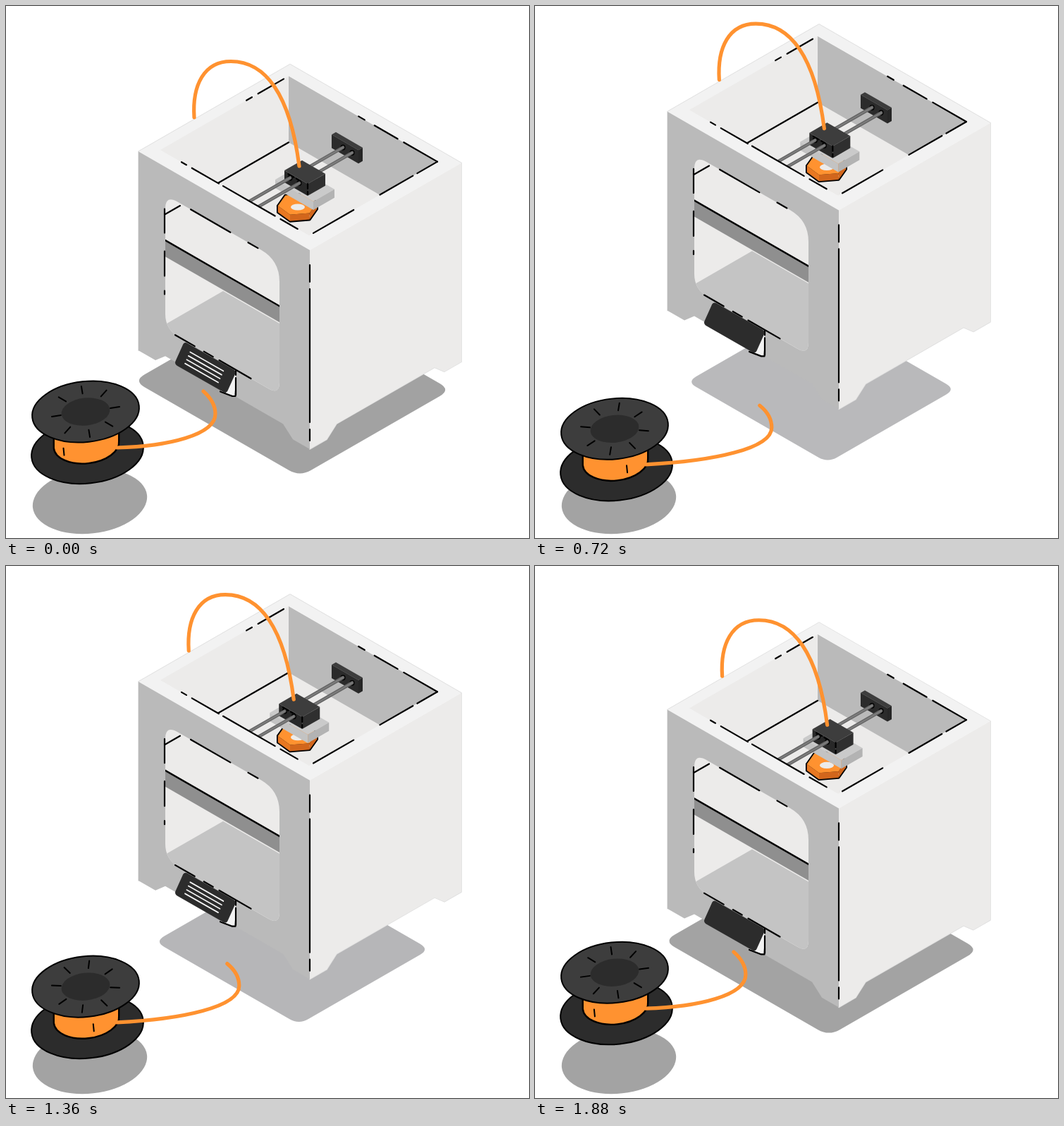
Write an HTML page with a canvas that moves like this. It is 742 by 754 pixels and loops after 1.92 s.

```html
<!DOCTYPE html>
<html lang="en">
<head>
<meta charset="utf-8">
<title>3D printer</title>
<style>
  html, body { margin: 0; width: 100%; height: 100%; overflow: hidden; background: #fff; }
  canvas { display: block; width: 742px; height: 754px; }
</style>
</head>
<body>
<canvas id="stage" width="742" height="754"></canvas>
<script>
const ctx = document.getElementById('stage').getContext('2d');
const LOOP = 1920, STEP = 40;
const ORANGE = '#ff9230', LIGHT = '#ecebea', RIM = '#f2f2f2', GREY = '#bababa';
const DARK = '#2c2c2c', DISC = '#3d3d3d', BLACK = '#000';
const RAD = Math.PI / 180, TILT = -6.3 * RAD, SLOPE = 0.575;

// Printer sizes: width, depth and height of the shell, then the opening on top
const W = 243, D = 215, H = 282;
const IN = { a0: 18.5, a1: 229.5, b0: 17.5, b1: 199.5 };
const WIN = { a0: 43, a1: 205, top: 39.5, low: 230 };

// Box space to stage: a runs left and b right from the front corner, z runs down
const P = (a, b, z = 0) => [431 - a + b, 346 - SLOPE * (a + b) + z];

// ---- easing ----
const smooth = s => s * s * (3 - 2 * s);

// Eased curve with level ends and handles at x1 and x2
function ease(x, x1, x2) {
  let lo = 0, hi = 1;
  for (let i = 0; i < 24; i++) {
    const p = (lo + hi) / 2, q = 1 - p;
    if (3 * q * q * p * x1 + 3 * q * p * p * x2 + p ** 3 < x) lo = p; else hi = p;
  }
  return smooth(lo);
}

// There and back: each way takes `half` ms
function swing(t, half) {
  const s = (t % (2 * half)) / half;
  return s < 1 ? smooth(s) : 1 - smooth(s - 1);
}

const liftAt = t => 70 * (t < 1000 ? smooth(t / 1000) : 1 - ease((t - 1000) / 1000, 0.167, 0.667));

// ---- drawing helpers ----
function trace(pts) {
  ctx.beginPath();
  pts.forEach(p => ctx.lineTo(...p));
}

function fill(color) {
  ctx.fillStyle = color;
  ctx.fill();
}

function stroke(color, width) {
  ctx.strokeStyle = color;
  ctx.lineWidth = width;
  ctx.lineCap = ctx.lineJoin = 'round';
  ctx.stroke();
}

function poly(color, ...pts) {
  trace(pts);
  ctx.closePath();
  fill(color);
}

function line(color, width, ...pts) {
  trace(pts);
  stroke(color, width);
}

// Broken black line; the pattern lists dash, gap, dash ...
function dashed(from, to, ...pattern) {
  ctx.setLineDash([...pattern, 999]);
  line(BLACK, 2.2, from, to);
  ctx.setLineDash([]);
}

function oval(x, y, rx, ry, color, edge = 0, tilt = TILT) {
  ctx.beginPath();
  ctx.ellipse(x, y, rx, ry, tilt, 0, 2 * Math.PI);
  fill(color);
  if (edge) stroke(BLACK, edge);
}

function roundPath(pts, cuts) {
  const n = pts.length;
  const toward = (p, q, cut) => {
    const k = cut / Math.hypot(q[0] - p[0], q[1] - p[1]);
    return [p[0] + (q[0] - p[0]) * k, p[1] + (q[1] - p[1]) * k];
  };
  ctx.beginPath();
  pts.forEach((p, i) => {
    ctx.lineTo(...toward(p, pts[(i + n - 1) % n], cuts[i]));
    ctx.quadraticCurveTo(...p, ...toward(p, pts[(i + 1) % n], cuts[i]));
  });
  ctx.closePath();
}

// Solid block from its front upper corner
function block(a, b, z, da, db, h, [top, left, right]) {
  const A = a + da, B = b + db;
  poly(top, P(a, b, z), P(A, b, z), P(A, B, z), P(a, B, z));
  poly(left, P(a, b, z), P(A, b, z), P(A, b, z + h), P(a, b, z + h));
  poly(right, P(a, b, z), P(a, B, z), P(a, B, z + h), P(a, b, z + h));
}

function group(dx, dy, draw) {
  ctx.save();
  ctx.translate(dx, dy);
  draw();
  ctx.restore();
}

// ---- parts ----
function floorShadow(u) {
  const k = 1 - 0.19 * u, tone = 162 + 29 * u, z = 321;
  ctx.save();
  ctx.translate(406, 539);
  ctx.scale(k, k);
  ctx.translate(-420, -539);
  roundPath([P(0, 0, z), P(236, 0, z), P(236, 214, z), P(0, 214, z)], [18, 18, 18, 18]);
  fill(`rgb(${tone},${tone},${tone + 2 * u})`);
  ctx.restore();
}

function spool(u) {
  oval(115.5, 631.5, 79.7, 45, DARK, 2);

  ctx.beginPath();
  ctx.moveTo(160.3, 595);
  ctx.ellipse(114, 621.5, 46.5, 26.8, TILT, 0, Math.PI);
  ctx.lineTo(67.7, 595);
  fill(ORANGE);
  stroke(BLACK, 2.4);

  const x = 82 + 60 * u, y = 634.5 - 0.0045 * (x - 107) ** 2;
  line(BLACK, 2, [x - 0.5, y - 5], [x + 0.5, y + 5]);

  oval(113, 575, 76.2, 42.9, DISC, 2);
  oval(113, 575, 34.5, 19.5, DARK);
  ctx.save();
  ctx.translate(113, 575);
  ctx.rotate(TILT);
  for (let i = 0; i < 8; i++) {
    const a = (45 * i - 2.5 + 19 * u) * RAD, c = Math.cos(a), s = Math.sin(a);
    line(BLACK, 2, [35.5 * c, 26 * s], [48.5 * c, 36.5 * s]);
  }
  ctx.restore();
}

function feed(u) {
  const x = 297 + 48 * u, y = 24 * u;
  ctx.beginPath();
  ctx.moveTo(157, 626 + 29.5 * u);
  ctx.bezierCurveTo(230 + 29 * u, 624 + 26 * u, x, 608 + y, x, 578 + y);
  ctx.bezierCurveTo(x, 565 + y, x - 8, 554 + y, x - 17, 546 + 25 * u);
  stroke(ORANGE, 5.2);
}

// Lower edge of a wall with a foot at both ends
function feet(len, at) {
  const foot = 24, ramp = 38, belly = H - 14;
  return [[0, H], [foot, H], [ramp, belly], [len - ramp, belly], [len - foot, H], [len, H]]
    .map(([d, z]) => at(d, z));
}

function shell() {
  const front = feet(W, (d, z) => P(d, 0, z)), side = feet(D, (d, z) => P(0, d, z));
  const left = P(W, 0), back = P(W, D), right = P(0, D), corner = P(0, 0);
  line('#dedede', 1.6, front[5], left, back, right, ...side.slice().reverse());
  poly(RIM, left, back, right, corner);
  poly(LIGHT, corner, right, ...side.reverse());
  poly(GREY, corner, left, ...front.reverse());
  dashed(P(0, 0, 21), P(0, 0, H), 24, 10, 189, 10, 16);
}

function frontWindow() {
  const { a0, a1, top, low } = WIN, beam = 104, ground = 223, deep = 82;
  ctx.save();
  roundPath([P(a1, 0, top), P(a0, 0, top), P(a0, 0, low), P(a1, 0, low)], [20, 30, 18, 22]);
  fill(LIGHT);
  ctx.clip();
  poly('#c4c4c4', P(a1, 0, ground), P(a1, deep, ground), P(0, deep, ground), P(0, 0, low), P(a1, 0, low));
  poly('#8f8f8f', P(a1, 0, beam), P(a0, 0, beam), P(a0, 0, beam + 23), P(a1, 0, beam + 23));
  line(BLACK, 2.4, P(a1, 0, beam), P(a0, 0, beam));
  line(BLACK, 2.2, P(a1, 0, 67), P(a1, 21, 67));
  ctx.restore();

  dashed(P(a1 + 1, 0, 60), P(a1 + 1, 0, low), 34, 26, 35, 21, 5);
  dashed(P(169, 0, top), P(a0, 0, top), 65, 29, 16);
  dashed(P(191, 0, low), P(a0, 0, low), 32, 15, 15, 10, 52);
}

function panel(lit) {
  poly(RIM, [326, 517], [326, 553], [304, 547]);
  dashed([326, 517], [326, 551], 6, 4, 30);
  line(BLACK, 2.2, [326, 545], [325.5, 553], [321, 553], [304, 546.5]);

  // slanted face drawn as an upright card
  ctx.save();
  ctx.transform(1, 0.57, -0.45, 1, 254, 476);
  ctx.beginPath();
  ctx.roundRect(-1, 0, 74, 32, 4);
  fill(DARK);
  for (let i = 0; lit && i < 4; i++) {
    const y = 8.2 + 5.4 * i;
    line('#f4f4f4', 1.6, [11, y], [58, y]);
  }
  ctx.restore();
}

function nut() {
  const hex = z => Array.from({ length: 6 }, (_, i) => {
    const a = (60 * i - 8) * RAD;
    return [413.5 + 28 * Math.cos(a), 281 + 16 * Math.sin(a) + z];
  });
  const top = hex(0), low = hex(9);
  for (const ring of [low, top]) line(BLACK, 3.6, ...ring, ring[0], top[0]);
  line(BLACK, 3.6, top[3], low[3]);
  ['#d2661c', '#d2661c', '#e87822'].forEach((c, i) => poly(c, top[i], top[i + 1], low[i + 1], low[i]));
  poly(ORANGE, ...top);
  oval(414, 285, 10, 4.6, LIGHT, 0, 0);
}

function rod(a, from, to, z) {
  line('#646464', 4.8, P(a, from, z), P(a, to, z));
  line('#7c7c7c', 2.2, P(a, from, z), P(a, to, z));
}

function hole(a, b, z) {
  oval(...P(a, b, z), 3.6, 4, BLACK, 0, 0);
}

function carriage(shift) {
  const rods = [146.5, 133.5], z = 50, face = 118.5 - shift, wall = 193.5;
  block(124.5, wall, 41, 38, 6, 19, [DISC, '#2b2b2b', '#262626']);
  for (const a of rods) {
    hole(a, wall, z);
    rod(a, wall, face + 25, z);
  }
  block(111, face - 2.5, 61.5, 54, 30, 12, ['#cacaca', '#c3c3c3', '#b3b3b3']);
  block(121.5, face, 44, 33, 25, 17, [DISC, '#282828', '#2f2f2f']);
  dashed(P(121.5, face, 44), P(121.5, face, 61), 7, 4, 4);
  dashed(P(149, face, 46), P(132, face, 46), 9, 4, 6);
  for (const a of rods) {
    hole(a, face, z);
    rod(a, face, 0, z);
  }
}

function interior(shift) {
  const { a0, a1, b0, b1 } = IN, deep = 94;
  ctx.save();
  trace([P(a1, b0), P(a1, b1), P(a0, b1), P(a0, b0)]);
  fill(LIGHT);
  ctx.clip();
  poly(GREY, P(a1, b1), P(a0, b1), P(a0, b1, deep), P(a1, b1, deep));
  line(BLACK, 2.2, P(a1, b1, deep), P(a1, b0, deep));
  nut();
  carriage(shift);
  ctx.restore();

  dashed(P(a1, b1 - 7), P(a1, b0), 42, 10, 9);
  dashed(P(a0, b1), P(a1, b1), 55, 10, 38, 16, 10);
  dashed(P(a0, b1), P(a0, b0), 33, 7, 54, 43, 66);
  dashed(P(a1 - 30, b0), P(a0, b0), 8, 9, 44, 7, 85, 9, 28);
}

function tube() {
  ctx.beginPath();
  ctx.moveTo(267, 158);
  ctx.bezierCurveTo(264, 112, 281, 78.5, 319, 78.5);
  ctx.bezierCurveTo(368, 78.5, 403, 125, 416, 227);
  stroke(ORANGE, 5.2);
}

function draw(t) {
  const u = swing(t, 1000), shift = 9.6 * swing(t, 500);
  ctx.fillStyle = '#fff';
  ctx.fillRect(0, 0, 742, 754);
  floorShadow(u);
  oval(119, 702, 81.5, 45.6, '#a3a3a3');
  group(0, -liftAt(t), () => {
    shell();
    interior(shift);
    frontWindow();
    panel(t % 1000 < 500);
    group(-shift, shift * SLOPE, tube);
  });
  group(0, 30 * u, () => spool(u));
  feed(u);
}

function tick() {
  draw(Math.floor(performance.now() % LOOP / STEP) * STEP);
  requestAnimationFrame(tick);
}
tick();
</script>
</body>
</html>
```
